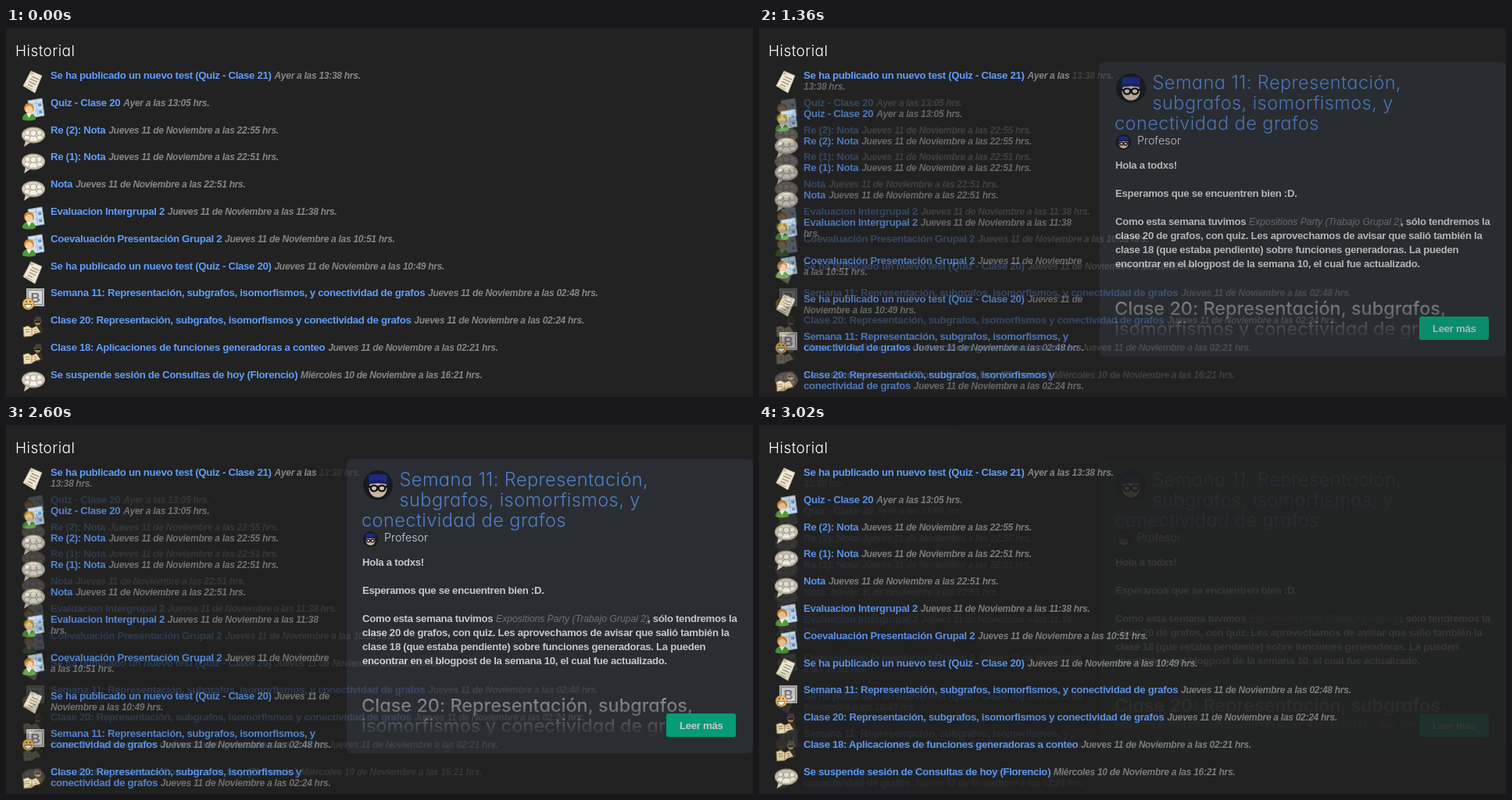
Animation, 956 px wide and 472 px high, one loop 3.08 s. Source, as an HTML page:

```html
<!DOCTYPE html>
<html lang="es">
<head>
<meta charset="utf-8">
<title>Historial</title>
<style>
html, body { margin: 0; width: 100%; height: 100%; overflow: hidden; background: #222; }
svg { display: block; }
text { white-space: pre; }
.title, .body, .date { font-family: "Liberation Sans", Arial, sans-serif; font-weight: 700; }
.title, .body { font-size: 13.2px; letter-spacing: -.3px; }
.title { fill: #5f9dfb; }
.body { fill: #f2f2f2; }
.date { font-size: 12px; font-style: italic; letter-spacing: -.28px; fill: #868686; }
.aside { font: italic 12.2px "Liberation Sans", Arial, sans-serif; fill: #85878a; }
.head {
  font-family: Inter, Lato, sans-serif; font-weight: 300;
  font-optical-sizing: none; font-feature-settings: "cv11"; fill: #fff;
}
.top { font-size: 19px; letter-spacing: .45px; }
.big { font-size: 23.6px; letter-spacing: .4px; }
.link { fill: #5a98f5; }
.semi { font-size: 23.4px; font-weight: 500; fill: #f2f2f2; letter-spacing: .05px; }

/* Stepped cross-fade: ten levels, 60 ms apart */
#narrow { animation: fade 3080ms infinite; }
@keyframes fade {
  0% { opacity: 0; animation-timing-function: step-end; }
  32.467% { opacity: .1; animation-timing-function: steps(9, end); }
  50% { opacity: 1; animation-timing-function: step-end; }
  82.467% { opacity: .9; animation-timing-function: steps(9, end); }
  100% { opacity: 0; }
}
</style>
</head>
<body>
<svg width="956" height="472" viewBox="0 0 956 472">
  <defs>
    <linearGradient id="veil" x1="0" y1="0" x2="0" y2="1">
      <stop offset="0" stop-color="#2d3239" stop-opacity="0"/>
      <stop offset="1" stop-color="#2d3239"/>
    </linearGradient>

    <g id="note">
      <path d="M12 1L26 7L17 29L2 20Z" fill="#efe7d3" stroke="#b9ad94" stroke-width=".8"/>
      <path d="M12 1L16 5L11 6Z" fill="#cabd9f"/>
      <path d="M13 8L22 12M11 11L20 15M9.500 14.500L18 18.500M8 18L14 21" stroke="#8d8371" stroke-width="1.200"/>
      <path d="M5 20L14 25" stroke="#c9a968" stroke-width="1.200"/>
    </g>

    <g id="quiz">
      <path d="M8 4L26 1L29 23L12 26Z" fill="#d3e1ef" stroke="#8fa9c4" stroke-width=".8"/>
      <path d="M18 3L21 24M10 9L27 6M17 17L28 15" stroke="#9bbbdc"/>
      <path d="M21 8L25 7.500L25.500 11L21.500 11.500ZM22 17L26 16.500L26.500 20L22.500 20.500Z" fill="#5b94cc"/>
      <path d="M1 28Q1 20 9 20Q18 20 18 28Q9 31 1 28Z" fill="#4c9a35"/>
      <path d="M6 20H13L9.500 26Z" fill="#f4f4f4"/>
      <circle cx="9.500" cy="13.500" r="6.500" fill="#d9862b"/>
      <ellipse cx="9.500" cy="15.500" rx="4.800" ry="5" fill="#f6cf9f"/>
    </g>

    <g id="chat">
      <path d="M5 20L3 28L12 22Z" fill="#cfc7b5"/>
      <ellipse cx="15" cy="13" rx="14.500" ry="9.800" fill="#d9d2c1" stroke="#a0957e" stroke-width="1.200"/>
      <g fill="#f5f1e8" stroke="#a69c88" stroke-width=".8">
        <path d="M3 18Q3 13 7.500 13Q11 13 11 20ZM19 20Q19 13 22.500 13Q27 13 27 18Z"/>
        <circle cx="7.500" cy="10" r="3.300"/><circle cx="22.500" cy="10" r="3.300"/>
        <path d="M9.500 21Q9.500 14 15 14Q20.500 14 20.500 21Z"/>
        <circle cx="15" cy="10.500" r="3.800"/>
      </g>
    </g>

    <g id="blog">
      <rect x="6" y="1" width="23" height="23" fill="#b4b4b4"/>
      <rect x="8.500" y="3.500" width="18" height="18" fill="#d8d8d8" stroke="#8c8c8c"/>
      <text x="11.500" y="18.500" font-family="Liberation Sans, sans-serif" font-weight="700" font-size="17" fill="#777">B</text>
      <circle cx="8.500" cy="21" r="7.300" fill="#eebd68" stroke="#a87830" stroke-width=".8"/>
      <path d="M4 21.500H13Q12 26.500 8.500 26.500Q5 26.500 4 21.500Z" fill="#fff" stroke="#704a1c" stroke-width=".8"/>
      <path d="M6 17V19M11 17V19" stroke="#593b18" stroke-width="1.300"/>
    </g>

    <g id="class">
      <path d="M15 22Q15 12 21 12Q28 12 27 22L22 25Z" fill="#363028"/>
      <circle cx="20.500" cy="9" r="4.200" fill="#9d8055"/>
      <path d="M14 6.500L17 5.500L18 1.500L25 2.500L25 6.500L28 8Q21 9 14 6.500Z" fill="#45403a"/>
      <path d="M17 9H24" stroke="#151515" stroke-width="1.800"/>
      <path d="M2 16L8 14L13 17L19 14.500L24 22L17 24L13 27L3 28Z" fill="#efdfb7" stroke="#9b7a42" stroke-width=".9"/>
      <path d="M13 17V26M4.500 19L10 18.500M5 22L10.500 21.500M15.500 19L19 18M16 22L20 20.500" stroke="#9b7a42" stroke-width=".9"/>
    </g>

    <g id="avatar">
      <circle r="19" fill="#17181c"/>
      <ellipse cy="4" rx="11.500" ry="11.500" fill="#f3dcc4"/>
      <path d="M-11 -3L-12 -13Q0 -16 12 -13L11 -3Z" fill="#1c2c9c"/>
      <path d="M-14 -4Q0 -8 14 -4L13 -1Q0 -4 -13 -1Z" fill="#15216f"/>
      <path d="M-12 2H12" stroke="#111" stroke-width="2.500"/>
      <g fill="#f8ece0" stroke="#111" stroke-width="2.400">
        <ellipse cx="-5" cy="4" rx="4.200" ry="3.600"/>
        <ellipse cx="5" cy="4" rx="4.200" ry="3.600"/>
      </g>
    </g>
  </defs>

  <rect width="956" height="472" fill="#222"/>
  <g id="wide"></g>

  <g id="narrow">
    <rect width="956" height="472" fill="#222"/>
    <g id="list"></g>
    <rect x="436" y="43.500" width="520" height="376.500" rx="6" fill="#2d3239"/>
    <use href="#avatar" x="476" y="77"/>
    <g class="head big link">
      <text x="503.500" y="78">Semana 11: Representación,</text>
      <text x="503.500" y="104">subgrafos, isomorfismos, y</text>
      <text x="455" y="130">conectividad de grafos</text>
    </g>
    <use href="#avatar" transform="translate(466.500 146) scale(.52)"/>
    <text class="head" font-size="14.300" x="484" y="149">Profesor</text>
    <g class="body">
      <text x="456" y="180">Hola a todxs!</text>
      <text x="456" y="216">Esperamos que se encuentren bien :D.</text>
      <text x="456" y="252">Como esta semana tuvimos</text>
      <text x="821" y="252">, sólo tendremos la</text>
      <text x="456" y="270">clase 20 de grafos, con quiz. Les aprovechamos de avisar que salió también la</text>
      <text x="456" y="288">clase 18 (que estaba pendiente) sobre funciones generadoras. La pueden</text>
      <text x="456" y="306">encontrar en el blogpost de la semana 10, el cual fue actualizado.</text>
    </g>
    <text class="aside" x="627" y="252">Expositions Party (Trabajo Grupal 2)</text>
    <g class="head semi">
      <text x="455" y="367">Clase 20: Representación, subgrafos,</text>
      <text x="455" y="393">isomorfismos y conectividad de grafos</text>
    </g>
    <rect x="446" y="318" width="500" height="83" fill="url(#veil)"/>
    <rect x="446" y="400.500" width="500" height="10" fill="#2d3239"/>
    <rect x="845" y="369" width="89" height="30" rx="3" fill="#00bc8c"/>
    <text class="body" x="862" y="389">Leer más</text>
  </g>

  <text class="head top" x="12" y="36">Historial</text>
</svg>

<script>
// "|" marks where a line breaks in the narrow layout
const day = 'Jueves 11 de Noviembre a las ';
const topic = 'Representación, subgrafos, isomorfismos';
const rows = [
  ['note', 'Se ha publicado un nuevo test (Quiz - Clase 21)', 'Ayer a las|13:38 hrs.'],
  ['quiz', 'Quiz - Clase 20', 'Ayer a las 13:05 hrs.'],
  ['chat', 'Re (2): Nota', day + '22:55 hrs.'],
  ['chat', 'Re (1): Nota', day + '22:51 hrs.'],
  ['chat', 'Nota', day + '22:51 hrs.'],
  ['quiz', 'Evaluacion Intergrupal 2', day + '11:38|hrs.'],
  ['quiz', 'Coevaluación Presentación Grupal 2', 'Jueves 11 de Noviembre|a las 10:51 hrs.'],
  ['note', 'Se ha publicado un nuevo test (Quiz - Clase 20)', 'Jueves 11 de|Noviembre a las 10:49 hrs.'],
  ['blog', `Semana 11: ${topic}, y|conectividad de grafos`, day + '02:48 hrs.'],
  ['class', `Clase 20: ${topic} y|conectividad de grafos`, day + '02:24 hrs.'],
  ['class', 'Clase 18: Aplicaciones de funciones generadoras a conteo', day + '02:21 hrs.'],
  ['chat', 'Se suspende sesión de Consultas de hoy (Florencio)', 'Miércoles 10 de Noviembre a las 16:21 hrs.']
];
const left = 57, pitch = 34.8, leading = 14;

function spans(kind, text, wrap, gap) {
  const parts = wrap ? text.split('|') : [text.replace('|', ' ')];
  return parts.map((part, i) => {
    const place = i ? `x="${left}" dy="${leading}"` : `dx="${gap}"`;
    return `<tspan class="${kind}" ${place}>${part}</tspan>`;
  }).join('');
}

function fill(id, items, wrap) {
  let y = 65, out = '';
  for (const [icon, title, date] of items) {
    const base = Math.round(y);
    out += `<use href="#${icon}" x="20" y="${base - 11}"/><text x="${left}" y="${base}">` +
      spans('title', title, wrap, 0) + spans('date', date, wrap, 3.8) + '</text>';
    y += pitch + (wrap && (title + date).includes('|') ? leading : 0);
  }
  document.getElementById(id).innerHTML = out;
}

fill('wide', rows, false);
fill('list', rows.slice(0, 10), true);
</script>
</body>
</html>
```
